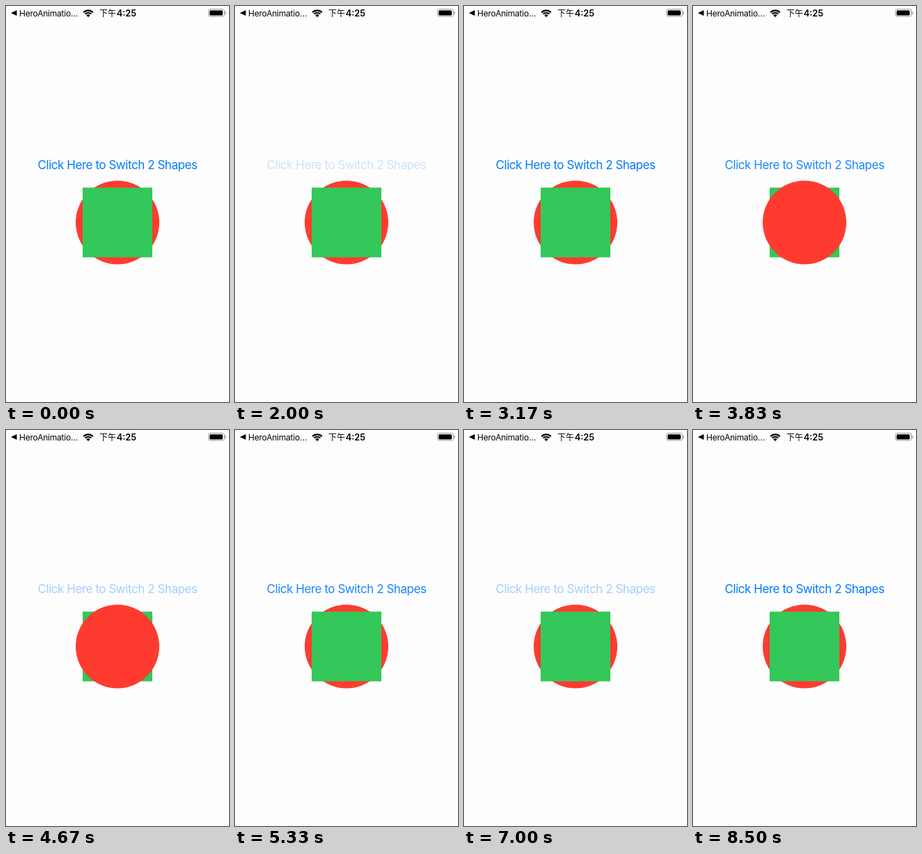
Recreate the animation shown at these times as an HTML page with a canvas. Size 320 by 568 pixels, loop 9.17 s.

```html
<!DOCTYPE html>
<html lang="en">
<head>
<meta charset="utf-8">
<title>Switch shapes</title>
<style>
  html, body { margin: 0; width: 100%; height: 100%; overflow: hidden; background: #fdfdfd; }
  canvas { display: block; width: 320px; height: 568px; }
</style>
</head>
<body>
<canvas id="stage"></canvas>
<script>
const W = 320, H = 568;
const LOOP = 9170;
const STEPS_PER_MS = 6 / 1000;
const BACKGROUND = '#fdfdfd';
const INK = '#000';

// Steps at which the button is pressed; each press is released one step later.
const PRESSES = [12, 16, 21, 24, 27, 30, 33, 37, 39, 41];
const PRESSED_ALPHA = 0.2;
const RELEASE_ALPHAS = [0.35, 0.9];

const canvas = document.getElementById('stage');
const ctx = canvas.getContext('2d');
const ratio = window.devicePixelRatio || 1;
canvas.width = W * ratio;
canvas.height = H * ratio;
ctx.scale(ratio, ratio);

function label(text, x, y, font, color, align = 'left', spacing = 0) {
  ctx.font = font;
  ctx.fillStyle = color;
  ctx.textAlign = align;
  ctx.letterSpacing = spacing + 'px';
  ctx.fillText(text, x, y);
}

function roundRect(x, y, w, h, r) {
  ctx.beginPath();
  ctx.roundRect(x, y, w, h, r);
}

function polygon(...points) {
  ctx.beginPath();
  points.forEach(([x, y]) => ctx.lineTo(x, y));
  ctx.closePath();
  ctx.fill();
}

function drawWifi(x, y) {
  const from = -Math.PI * 0.75, to = -Math.PI * 0.25;
  ctx.fillStyle = ctx.strokeStyle = INK;
  ctx.lineWidth = 2.1;
  for (const radius of [6.2, 9.6]) {
    ctx.beginPath();
    ctx.arc(x, y, radius, from, to);
    ctx.stroke();
  }
  ctx.beginPath();
  ctx.moveTo(x, y);
  ctx.arc(x, y, 3.7, from, to);
  ctx.fill();
}

function drawBattery() {
  ctx.strokeStyle = 'rgba(0,0,0,0.38)';
  ctx.lineWidth = 1;
  roundRect(290.5, 4.5, 23, 10.5, 2.8);
  ctx.stroke();
  ctx.fillStyle = 'rgba(0,0,0,0.4)';
  roundRect(314.5, 8, 1.4, 4, [0, 1.4, 1.4, 0]);
  ctx.fill();
  ctx.fillStyle = INK;
  roundRect(292.2, 6.2, 18.8, 7.2, 1.5);
  ctx.fill();
}

function drawStatusBar() {
  ctx.fillStyle = INK;
  polygon([7, 10], [15.5, 6], [15.5, 14]);
  label('HeroAnimatio…', 19, 14.5, '12px Inter, sans-serif', INK, 'left', -0.22);
  drawWifi(118, 16);
  label('下午', 134, 14.6, '500 12px "Noto Sans CJK TC", "Noto Sans CJK SC", "Noto Sans CJK", sans-serif', INK);
  label('4:25', 158.7, 14.5, '600 12.8px Inter, sans-serif', INK);
  drawBattery();
}

function drawCircle() {
  ctx.fillStyle = '#ff3b30';
  ctx.beginPath();
  ctx.arc(160, 310.5, 60, 0, Math.PI * 2);
  ctx.fill();
}

function drawSquare() {
  ctx.fillStyle = '#34c759';
  ctx.fillRect(110, 260.5, 100, 100);
}

function buttonAlpha(step) {
  const last = PRESSES.filter(press => press <= step).pop();
  if (last === undefined) return 1;
  const sinceRelease = step - last - 1;
  return sinceRelease < 0 ? PRESSED_ALPHA : RELEASE_ALPHAS[sinceRelease] ?? 1;
}

function draw(time) {
  const step = Math.floor((time + 5) * STEPS_PER_MS);
  const switches = PRESSES.filter(press => press < step).length;

  ctx.fillStyle = BACKGROUND;
  ctx.fillRect(0, 0, W, H);
  drawStatusBar();

  ctx.globalAlpha = buttonAlpha(step);
  label('Click Here to Switch 2 Shapes', 160, 234, '17px Inter, sans-serif', '#007aff', 'center', -0.45);
  ctx.globalAlpha = 1;

  const layers = [drawCircle, drawSquare];
  if (switches % 2) layers.reverse();
  layers.forEach(drawLayer => drawLayer());
}

function tick() {
  draw(performance.now() % LOOP);
  requestAnimationFrame(tick);
}
tick();
</script>
</body>
</html>
```
